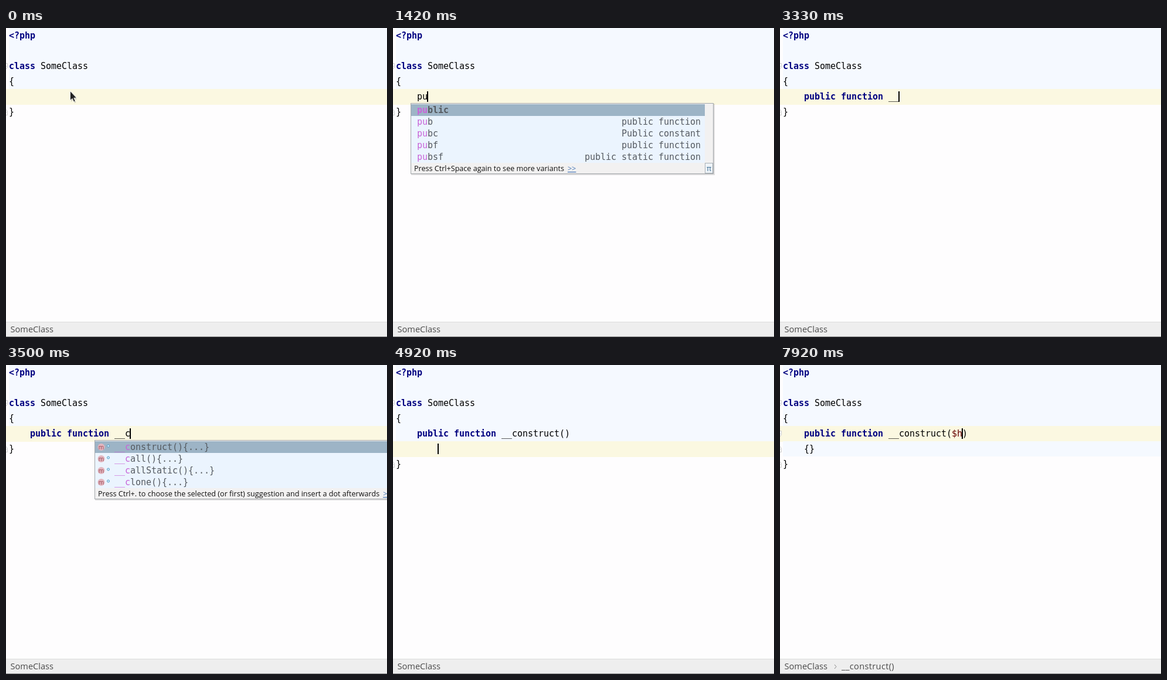
An HTML page that plays this animation: 650 by 527 pixels, repeating every 8000 ms.

```html
<!DOCTYPE html>
<html lang="en">
<head>
<meta charset="utf-8">
<title>Editor completion</title>
<style>
html, body { margin: 0; width: 100%; height: 100%; overflow: hidden; background: #fefdfe; }
#stage { display: block; width: 650px; height: 527px; }
text { white-space: pre; }
.code { font: 15px "DejaVu Sans Mono", monospace; letter-spacing: -.03px; fill: #000; }
.kw { font-weight: bold; fill: #000080; }
.var { fill: #660000; }
.row { fill: #555a60; }
.bold { font-weight: bold; }
.hit { fill: #c864d8; }
.hint { font: 12.6px "Open Sans", "Noto Sans", sans-serif; fill: #111; }
.link { fill: #4a78b8; text-decoration: underline; }
.bar { font: 14.6px "Open Sans", "Noto Sans", sans-serif; fill: #4a4a4a; }
.wide { letter-spacing: .34px; }
.fold { fill: #fff; stroke: #cfcfcf; }
</style>
</head>
<body>
<svg id="stage" viewBox="0 0 650 527" xmlns="http://www.w3.org/2000/svg"></svg>
<script>
const LOOP = 8000, CELL = 9, LINE = 26, LEFT = 5, ROW = 20, TOP = 130;
const stage = document.getElementById('stage');

const hints = {
  more: 'Press Ctrl+Space again to see more variants',
  move: 'Ctrl+Down and Ctrl+Up will move caret down and up in the editor',
  dot: 'Press Ctrl+. to choose the selected (or first) suggestion and insert a dot afterwards'
};

// Keywords are rows without a description
const pubRows = [['public'], ['pub', 'public function'], ['pubc', 'Public constant'],
  ['pubf', 'public function'], ['pubsf', 'public static function']];
const pRows = [['public'], ['private'], ['protected'], ['pric', 'Private constant'],
  ['prif', 'private function'], ['prisf', 'private static function'],
  ['prof', 'protected function'], ['prosf', 'protected static function'], ...pubRows.slice(1)];
const magic = names => names.split(' ').map(n => ['__' + n + '(){...}', '']);

const accessList = (rows, hit) => ({ x: 30, w: 517, rows, hit, hint: hints.more, track: true });
const wordList = (rows, hit) => ({ x: 93, w: 517, rows, hit, hint: hints.move });
const magicList = (names, hit) => ({ x: 151, w: 560, rows: magic(names), hit, hint: hints.dot, icons: true });

// Each step overrides only what it names
const steps = [
  [0, { code: '', kw: 0, line: 4, col: null, mouse: 'arrow', popup: null, body: null, match: false, path: false, folds: false }],
  [80, { mouse: 'beam' }],
  [250, { col: 4 }],
  [1080, { col: null }],
  [1250, { code: 'p', col: 5, mouse: null }],
  [1330, { popup: accessList(pRows, 1) }],
  [1420, { code: 'pu', col: 6, popup: accessList(pubRows, 2) }],
  [1670, { code: 'pub', col: 7, popup: accessList(pubRows, 3) }],
  [1750, { code: 'publ', col: 8, popup: accessList([['public']], 4) }],
  [1830, { code: 'publi', col: 9, popup: accessList([['public']], 5) }],
  [1920, { code: 'public', col: 10, popup: accessList([['public']], 6) }],
  [2000, { code: 'public ', col: 11, popup: null }],
  [2080, { kw: 6 }],
  [2330, { code: 'public f', col: 12, popup: wordList([['function'], ['final']], 1) }]
];
['fu', 'fun', 'func', 'funct'].forEach((s, i) => steps.push([[2420, 2580, 2750, 2830][i],
  { code: 'public ' + s, col: 11 + s.length, popup: wordList([['function']], s.length) }]));
const fn = 'public function ';
steps.push(
  [2920, { code: fn, col: 20, popup: null }],
  [3000, { kw: 15 }],
  [3170, { code: fn + '_', col: 21 }],
  [3330, { code: fn + '__', col: 22 }],
  [3420, { popup: magicList('construct destruct call callStatic get set isset unset sleep wakeup toString invoke', 2) }]
);
for (let n = 1; n <= 9; n++) {
  const name = '__' + 'construct'.slice(0, n);
  steps.push([Math.round((3416.7 + n * 83.33) / 10) * 10, {
    code: fn + name, col: 22 + n,
    popup: magicList(n < 2 ? 'construct call callStatic clone' : 'construct', n + 2)
  }]);
}
steps.push(
  [4330, { code: fn + '__construct()', col: 32, popup: null }],
  [4670, { col: 33 }],
  [4750, { match: true, path: true }],
  [4830, { line: 5, col: 8, body: '', match: false }],
  [4920, { path: false }],
  [5170, { body: '{}', col: 5 }],
  [5500, { folds: true, path: true }],
  [6080, { line: 4 }],
  [6170, { col: 33 }],
  [6250, { match: true }],
  [6420, { col: 32, match: false }],
  [7500, { code: fn + '__construct($)', col: 33 }],
  [7920, { code: fn + '__construct($h)', col: 34 }]
);

const rect = (x, y, w, h, fill, extra = '') =>
  `<rect x="${x}" y="${y}" width="${w}" height="${h}" fill="${fill}" ${extra}/>`;
const esc = s => s.replace(/&/g, '&amp;').replace(/</g, '&lt;').replace(/>/g, '&gt;');
const span = (cls, s) => `<tspan class="${cls}">${s}</tspan>`;
const text = (cls, x, y, s, extra = '') => `<text class="${cls}" x="${x}" y="${y}" ${extra}>${s}</text>`;
const colX = c => LEFT + c * CELL;
const codeAt = (col, line, s) => text('code', colX(col), 18 + line * LINE, s);

function fold(line, end) {
  const y = line * LINE + 13;
  const d = end ? `M-5 ${y + 5.5}H2.5V${y - 1}L-1 ${y - 5}` : `M-5 ${y - 4.5}H2.5V${y + 2}L-1 ${y + 6}`;
  return `<path class="fold" d="${d}"/>` + rect(0, y, 1, 1, '#bbb');
}

function drawPopup(p) {
  const h = Math.min(p.rows.length * ROW, 230), foot = TOP + h, inner = p.w - (p.track ? 15 : 1);
  let rows = '';
  p.rows.forEach(([name, note], i) => {
    const y = i * ROW, tx = p.icons ? 34 : 11;
    rows += rect(0, y, inner, ROW, i ? '#ebf4fe' : '#9db4c6');
    rows += text('code row' + (note === undefined ? ' bold' : ''), tx - 1, y + 15,
      span('hit', name.slice(0, p.hit)) + name.slice(p.hit));
    if (note) rows += text('code row', 494, y + 15, note, 'text-anchor="end"');
    if (p.icons) rows += `<circle cx="10.5" cy="${y + 10}" r="6" fill="#e3b6bf"/>` +
      text('hint', 10.5, y + 13.5, 'm', 'text-anchor="middle" style="font-size:10px;fill:#93404c"') +
      `<circle cx="22.5" cy="${y + 8}" r="2" fill="#d8edf8" stroke="#4a9cc9"/>`;
  });
  let out = rect(p.x + 1, 129, p.w + 1, foot - 108, '#000', 'opacity=".12"') +
    rect(p.x + .5, 128.5, p.w - 1, foot - 110, '#f2f1f1', 'stroke="#a3a7aa"') +
    `<svg x="${p.x + 1}" y="${TOP}" width="${inner - 1}" height="${h}">${rows}</svg>` +
    text('hint', p.x + 6, foot + 14, esc(p.hint) + `<tspan class="link" dx="6">&gt;&gt;</tspan>`);
  if (p.track) out += rect(p.x + 502.5, foot + .5, 13, 17, '#eef3f8', 'stroke="#a9b0b6"') +
    text('hint', p.x + 509, foot + 14, 'π', 'text-anchor="middle" style="fill:#35688f"');
  return out;
}

const pointers = {
  arrow: '<path d="M111 110V126L114.500 122.500L117 128L119.500 127L117 121.500H121Z" opacity=".15"/>' +
    '<path d="M109.500 107.500V123.500L113.200 120.300L115.700 126L118.300 124.900L115.800 119.300H120.500Z" fill="#222" stroke="#fff" stroke-width=".8"/>',
  beam: '<path d="M107 101.500H109L110 102.500L111 101.500H113M110 102.500V115.500M107 116.500H109L110 115.500L111 116.500H113" fill="none" stroke="#222"/>'
};

function draw(s) {
  const open = s.body !== null, last = open ? 6 : 5;
  const blueEnd = s.folds ? 6 : open ? 5 : 4;
  let out = rect(0, 0, 650, 527, '#fefdfe') +
    rect(LEFT, 0, 645, blueEnd * LINE, '#f5f9ff') +
    rect(0, s.line * LINE, 650, 27, '#fbf8e1');
  if (s.folds && s.line === 4) out += rect(LEFT, 130, 645, LINE, '#f5f9ff');
  if (s.match) out += rect(colX(31), 104, 18, LINE, '#99ccff');

  out += fold(2) + fold(last, true);
  if (s.folds) out += fold(4) + fold(5, true);

  const rest = s.code.slice(s.kw).replace(/\$\w*/, v => span('var', v));
  out += codeAt(0, 0, span('kw', '&lt;?php')) +
    codeAt(0, 2, span('kw', 'class') + ' SomeClass') +
    codeAt(0, 3, '{') +
    codeAt(4, 4, span('kw', s.code.slice(0, s.kw)) + rest) +
    codeAt(4, 5, s.body || '') +
    codeAt(0, last, '}');
  if (s.col !== null) out += rect(colX(s.col) - 1, s.line * LINE + 4, 2, 18, '#000');

  out += rect(0, 501, 650, 26, '#eeeeee') + rect(0, 501, 650, 1, '#dcdcdc') + rect(0, 526, 650, 1, '#8c8c8c') +
    text('bar', 7.5, 519, 'SomeClass');
  if (s.path) out += '<path d="M93 511L96 514.500L93 518" fill="none" stroke="#888"/>' +
    text('bar wide', 105, 519, '__construct()');

  if (s.popup) out += drawPopup(s.popup);
  if (s.mouse) out += pointers[s.mouse];
  stage.innerHTML = out;
}

let shown = -1;
const start = performance.now();
function tick(now) {
  const t = Math.max(0, now - start) % LOOP;
  const count = steps.filter(([at]) => at <= t).length;
  if (count !== shown) {
    shown = count;
    draw(Object.assign({}, ...steps.slice(0, count).map(([, change]) => change)));
  }
  requestAnimationFrame(tick);
}
tick(start);
</script>
</body>
</html>
```
